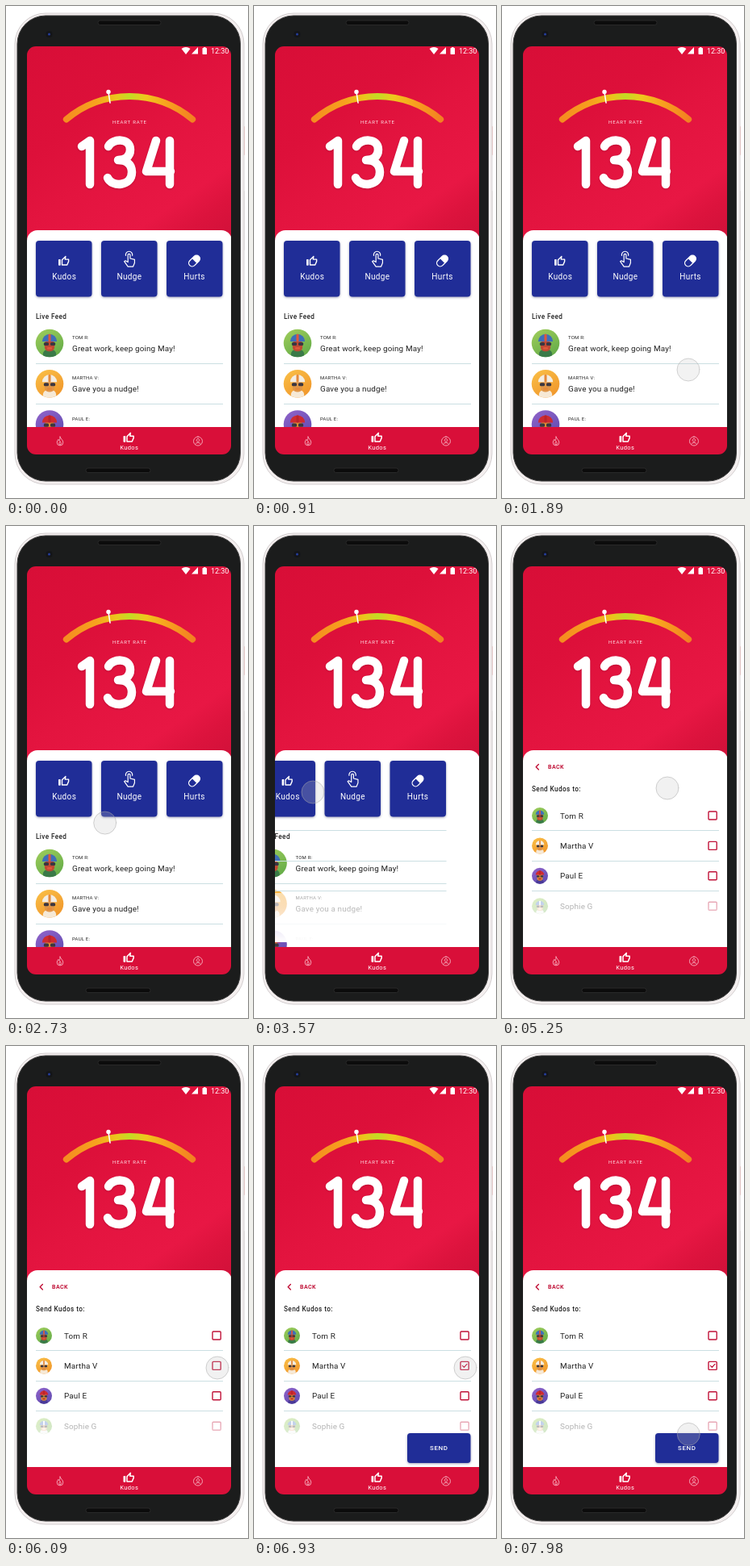
Write an HTML page with a canvas that moves like this. It is 300 px wide and 610 px high and loops after 8 s.

```html
<!DOCTYPE html>
<html lang="en">
<head>
<meta charset="utf-8">
<title>Heart rate kudos</title>
<style>
  html, body { margin: 0; width: 100%; height: 100%; overflow: hidden; background: #fff; }
  canvas { display: block; width: 300px; height: 610px; }
</style>
</head>
<body>
<canvas id="stage"></canvas>
<script>
const canvas = document.getElementById('stage');
const ctx = canvas.getContext('2d');
const dpr = window.devicePixelRatio || 1;
canvas.width = 300 * dpr;
canvas.height = 610 * dpr;

const LOOP = 8000, STEP = 70;
const RED = '#d90f39', DEEP = '#c01238', BLUE = '#202d97', INK = '#222', LINE = '#cbdfe2';
const SLIDE = 253;

const riders = [
  { name: 'Tom R', msg: 'Great work, keep going May!', bg: ['#9ccb5a', '#62ab48'], hat: '#3f6fb8', face: '#c04a34', body: '#3a7a48', trim: '#e0583a' },
  { name: 'Martha V', msg: 'Gave you a nudge!', bg: ['#f9bd45', '#f0952a'], hat: '#f3ede2', face: '#e09648', body: '#f6e9d6', trim: '#e58a3a' },
  { name: 'Paul E', msg: 'Great effort today!', bg: ['#8d62c8', '#5f4bb0'], hat: '#cf2b30', face: '#d98a34', body: '#4a3a98', trim: '#b8242c' },
  { name: 'Sophie G', msg: '', bg: ['#a8d46a', '#6fb350'], hat: '#5a83c9', face: '#eab98c', body: '#f2f2f2', trim: '#ffffff' }
];

const clamp = v => Math.max(0, Math.min(1, v));
const span = (t, from, to) => clamp((t - from) / (to - from));
const sine = p => (1 - Math.cos(Math.PI * p)) / 2;
const cubic = p => p < .5 ? 4 * p ** 3 : 1 - (2 - 2 * p) ** 3 / 2;
const mix = (a, b, p) => a + (b - a) * p;

function scoped(draw) {
  ctx.save();
  draw();
  ctx.restore();
}

function box(x, y, w, h, r) {
  ctx.beginPath();
  ctx.roundRect(x, y, w, h, r);
}

function fillBox(x, y, w, h, r, color) {
  box(x, y, w, h, r);
  ctx.fillStyle = color;
  ctx.fill();
}

function disc(x, y, r, color) {
  ctx.beginPath();
  ctx.arc(x, y, r, 0, Math.PI * 2);
  ctx.fillStyle = color;
  ctx.fill();
}

function text(str, x, y, size, color = INK, weight = 400, gap = .15, align = 'left') {
  ctx.font = `${weight} ${size}px Roboto, sans-serif`;
  ctx.letterSpacing = gap + 'px';
  ctx.textAlign = align;
  ctx.fillStyle = color;
  ctx.fillText(str, x + (align === 'center' ? gap / 2 : 0), y);
}

// Strokes an SVG path centred on a 24-unit grid.
function icon(d, x, y, size, color, width) {
  scoped(() => {
    const k = size / 24;
    ctx.translate(x - size / 2, y - size / 2);
    ctx.scale(k, k);
    ctx.lineWidth = width / k;
    ctx.lineCap = ctx.lineJoin = 'round';
    ctx.strokeStyle = color;
    ctx.stroke(new Path2D(d));
  });
}

const THUMB = 'M8 10V20H18L21 13V9H14L15 3ZM2 10V20H4V10Z';
const FLAME = 'M12 2C13 7 19 9 19 15A7 7 0 0 1 5 15C5 12 7 10 8 8L10 11C12 8 12 5 12 2ZM12 13C14 15 15 17 14 19A2.4 2.4 0 0 1 10 19C9 17 11 15 12 13Z';
const FINGER = 'M10 15V7A1.6 1.6 0 0 1 13 7V12L19 13.5V18L17 23H10L5 16L6.5 15L10 17ZM7 8A4.6 4.6 0 1 1 16 8';

function rule(y) {
  ctx.fillStyle = LINE;
  ctx.fillRect(37, y, 232, 1);
}

function avatar(p, x, y, r) {
  scoped(() => {
    ctx.translate(x, y);
    ctx.scale(r / 17, r / 17);
    const g = ctx.createLinearGradient(-10, -17, 10, 17);
    g.addColorStop(0, p.bg[0]);
    g.addColorStop(1, p.bg[1]);
    disc(0, 0, 17, g);
    ctx.clip();
    fillBox(-8, 8, 16, 12, 5, p.body);
    fillBox(-6, -4, 12, 14, 5, p.face);
    ctx.beginPath();
    ctx.arc(0, -2, 9, Math.PI, 0);
    ctx.fillStyle = p.hat;
    ctx.fill();
    fillBox(-1.5, -11, 3, 9, 1, p.trim);
    fillBox(-7, -1, 6, 4, 1.5, '#3a3640');
    fillBox(1, -1, 6, 4, 1.5, '#3a3640');
    fillBox(-3, 5, 6, 2.5, 1, p.trim);
  });
}

function phone() {
  fillBox(292, 149, 4, 36, 1, '#ecb9b4');
  fillBox(292, 229, 4, 74, 1, '#e6e3e3');
  fillBox(11, 9, 284, 584, 38, '#f4efef');
  ctx.strokeStyle = '#d3cecf';
  ctx.lineWidth = 1;
  ctx.stroke();
  fillBox(14, 12, 276.5, 577, 35, '#1b1c1c');
  ctx.strokeStyle = '#3a3a3a';
  ctx.stroke();
  for (const [x, y, w] of [[114, 18, 78], [99, 573, 80]]) {
    fillBox(x, y, w, 5.5, 2.7, '#0c0c0c');
    ctx.strokeStyle = '#333';
    ctx.lineWidth = .7;
    ctx.stroke();
  }
  disc(53.5, 35, 4, '#141519');
  disc(53.5, 35, 1.5, '#253e9c');
}

function statusBar() {
  ctx.fillStyle = '#fff';
  ctx.beginPath();
  ctx.moveTo(223, 60);
  ctx.lineTo(217.5, 53);
  ctx.quadraticCurveTo(223, 49, 228.5, 53);
  ctx.fill();
  ctx.beginPath();
  ctx.moveTo(230, 59.5);
  ctx.lineTo(238, 59.5);
  ctx.lineTo(238, 51);
  ctx.fill();
  fillBox(243.5, 52, 5.5, 8, .7, '#fff');
  fillBox(245, 51, 2.5, 2, 0, '#fff');
  scoped(() => {
    box(250, 50, 26, 12, 0);
    ctx.clip();
    text('12:30', 254, 59, 9, '#fff', 400, 0);
  });
}

function gauge() {
  const cx = 153, cy = 233.3, r = 121.3, half = .7;
  const g = ctx.createLinearGradient(70, 0, 236, 0);
  [[0, '#f58a20'], [.25, '#f7a11e'], [.4, '#ecc51c'], [.5, '#c3db24'], [.62, '#efc81d'], [.78, '#f8a01f'], [1, '#f27d22']]
    .forEach(([at, c]) => g.addColorStop(at, c));
  ctx.beginPath();
  ctx.arc(cx, cy, r, -Math.PI / 2 - half, -Math.PI / 2 + half);
  ctx.lineWidth = 8;
  ctx.lineCap = 'round';
  ctx.strokeStyle = g;
  ctx.stroke();
  ctx.beginPath();
  ctx.moveTo(127, 107);
  ctx.lineTo(129, 120);
  ctx.lineWidth = 1.6;
  ctx.strokeStyle = '#fff';
  ctx.stroke();
  disc(127, 106.5, 2.7, '#fff');
}

function heartRate() {
  const g = ctx.createLinearGradient(26, 50, 215, 322);
  [[0, '#d80e37'], [.35, '#dd103a'], [.55, '#e3143f'], [.8, '#e81744'], [.9, '#dc133d'], [1, '#d3113a']]
    .forEach(([at, c]) => g.addColorStop(at, c));
  ctx.fillStyle = g;
  ctx.fillRect(26, 50, 254, 250);
  statusBar();
  gauge();
  text('HEART RATE', 153, 146, 6, '#ffe6ea', 400, .85, 'center');
  scoped(() => {
    ctx.lineWidth = 10.5;
    ctx.lineCap = ctx.lineJoin = 'round';
    ctx.strokeStyle = '#fff';
    ctx.shadowColor = 'rgba(130,0,30,.35)';
    ctx.shadowBlur = 3;
    ctx.shadowOffsetY = 1;
    ctx.stroke(new Path2D(
      'M94 174L104 167V221' +
      'M127 174C132 164 154 163 154 178C154 188 146 191 139 191C149 191 156 196 156 206C156 224 131 225 126 213' +
      'M186 167L174 205H204M203 167V221'
    ));
  });
}

function blueButton(x, y, w, h) {
  scoped(() => {
    ctx.shadowColor = 'rgba(20,25,80,.4)';
    ctx.shadowBlur = 3;
    ctx.shadowOffsetY = 1;
    fillBox(x, y, w, h, 4, BLUE);
  });
}

function pill(x, y) {
  scoped(() => {
    ctx.translate(x, y);
    ctx.rotate(-Math.PI / 4);
    box(-8, -4.2, 16, 8.4, 4.2);
    ctx.strokeStyle = '#fff';
    ctx.lineWidth = 1.3;
    ctx.stroke();
    fillBox(0, -4.2, 8, 8.4, [0, 4.2, 4.2, 0], '#fff');
  });
}

function feedPage() {
  ['Kudos', 'Nudge', 'Hurts'].forEach((label, i) => {
    blueButton(37 + 81 * i, 291, 69.5, 69.5);
    text(label, 72 + 80.7 * i, 339, 10, '#fff', 400, .35, 'center');
  });
  icon(THUMB, 72, 316, 15, '#fff', 1.4);
  icon(FINGER, 153, 313, 22, '#fff', 1.2);
  pill(233.5, 316);
  text('Live Feed', 37, 388, 8.2, INK, 500, .4);
  riders.slice(0, 3).forEach((p, i) => {
    const y = 418 + 50.3 * i;
    avatar(p, 54, y, 17.3);
    text(p.name.toUpperCase() + ':', 82, y - 5, 6, INK, 400, .2);
    text(p.msg, 82, y + 10, 9.9);
  });
  rule(443);
  rule(493);
}

function listRules() {
  [377, 415, 452].forEach(rule);
}

function listFade() {
  const g = ctx.createLinearGradient(0, 449, 0, 516);
  g.addColorStop(0, 'rgba(255,255,255,.55)');
  g.addColorStop(.35, 'rgba(255,255,255,.66)');
  g.addColorStop(1, '#fff');
  ctx.fillStyle = g;
  ctx.fillRect(26, 455, 254, 61);
}

function listPage(checked) {
  icon('M15 5L8 12L15 19', 44, 298.7, 11, DEEP, 1.4);
  text('BACK', 57, 301, 7, DEEP, 700, .45);
  text('Send Kudos to:', 37, 329, 8.2, INK, 500, .4);
  listRules();
  riders.forEach((p, i) => {
    const y = 359 + 37.4 * i;
    avatar(p, 47, y, 10);
    text(p.name, 72, y + 3.5, 9.9);
    box(256, y - 5, 10.2, 10, 1);
    ctx.strokeStyle = DEEP;
    ctx.lineWidth = 1.4;
    ctx.stroke();
    if (i === 1 && checked) icon('M5 12L10 17L19 7', 261.2, y, 9.5, DEEP, 1.3);
  });
  listFade();
}

function sendButton(p) {
  if (!p) return;
  scoped(() => {
    ctx.globalAlpha = p;
    ctx.translate(0, 42 * (1 - p));
    blueButton(190, 480, 78.5, 37);
    text('SEND', 229, 501, 8, '#fff', 500, .6, 'center');
  });
}

function navBar() {
  fillBox(26, 522, 254, 35, 0, RED);
  icon(FLAME, 67, 539.5, 13, '#f6b3c1', .9);
  icon(THUMB, 152.5, 535, 15, '#fff', 1.5);
  text('Kudos', 152.5, 549.5, 7.5, '#fff', 400, .4, 'center');
  icon('M12 1A11 11 0 1 1 11.9 1ZM12 6A3.6 3.6 0 1 1 11.9 6ZM5 20C7 14 17 14 19 20', 238, 539.5, 12, '#f6b3c1', .9);
}

function touchPoint(t) {
  if (t < 3940) {
    const p = sine(span(t, 1960, 3200));
    return [mix(231, 73, p), mix(451, 330, p)];
  }
  if (t < 7100) {
    const u = sine(span(t, 3950, 6050)), v = 1 - u;
    const curve = (a, b, c, d) => a * v ** 3 + 3 * b * v * v * u + 3 * c * v * u * u + d * u ** 3;
    return [curve(73, 144, 202, 262), curve(330, 314.6, 276.4, 399)];
  }
  const p = sine(span(t, 7150, 8257));
  return [mix(262, 226, p), mix(399, 495.5, p)];
}

function touch(t) {
  const alpha = span(t, 1750, 1900);
  if (!alpha) return;
  const [x, y] = touchPoint(t);
  scoped(() => {
    ctx.globalAlpha = alpha;
    disc(x, y, 14, 'rgba(195,195,195,.24)');
    ctx.strokeStyle = 'rgba(165,165,165,.5)';
    ctx.lineWidth = 1;
    ctx.stroke();
  });
}

function panel(t) {
  const p = cubic(span(t, 3430, 3880));
  scoped(() => {
    fillBox(26, 278, 254, 245, [13, 13, 0, 0], '#fff');
    ctx.clip();
    if (p < 1) scoped(() => {
      ctx.translate(-SLIDE * p, 0);
      feedPage();
      if (p > 0) {
        ctx.globalAlpha = clamp(p * 10);
        listRules();
        listFade();
      }
    });
    if (p > .15) scoped(() => {
      ctx.globalAlpha = span(p, .15, .6);
      ctx.translate(SLIDE * (1 - p), 0);
      listPage(t >= 6370);
    });
    sendButton(sine(span(t, 6420, 6740)));
  });
}

function render(t) {
  ctx.setTransform(dpr, 0, 0, dpr, 0, 0);
  ctx.fillStyle = '#fff';
  ctx.fillRect(0, 0, 300, 610);
  phone();
  scoped(() => {
    box(26, 50, 253, 506, 11);
    ctx.clip();
    heartRate();
    panel(t);
    navBar();
    touch(t);
  });
}

const start = performance.now();
function tick() {
  const t = (performance.now() - start) % LOOP;
  render(Math.floor(t / STEP) * STEP);
  requestAnimationFrame(tick);
}
tick();
</script>
</body>
</html>
```
